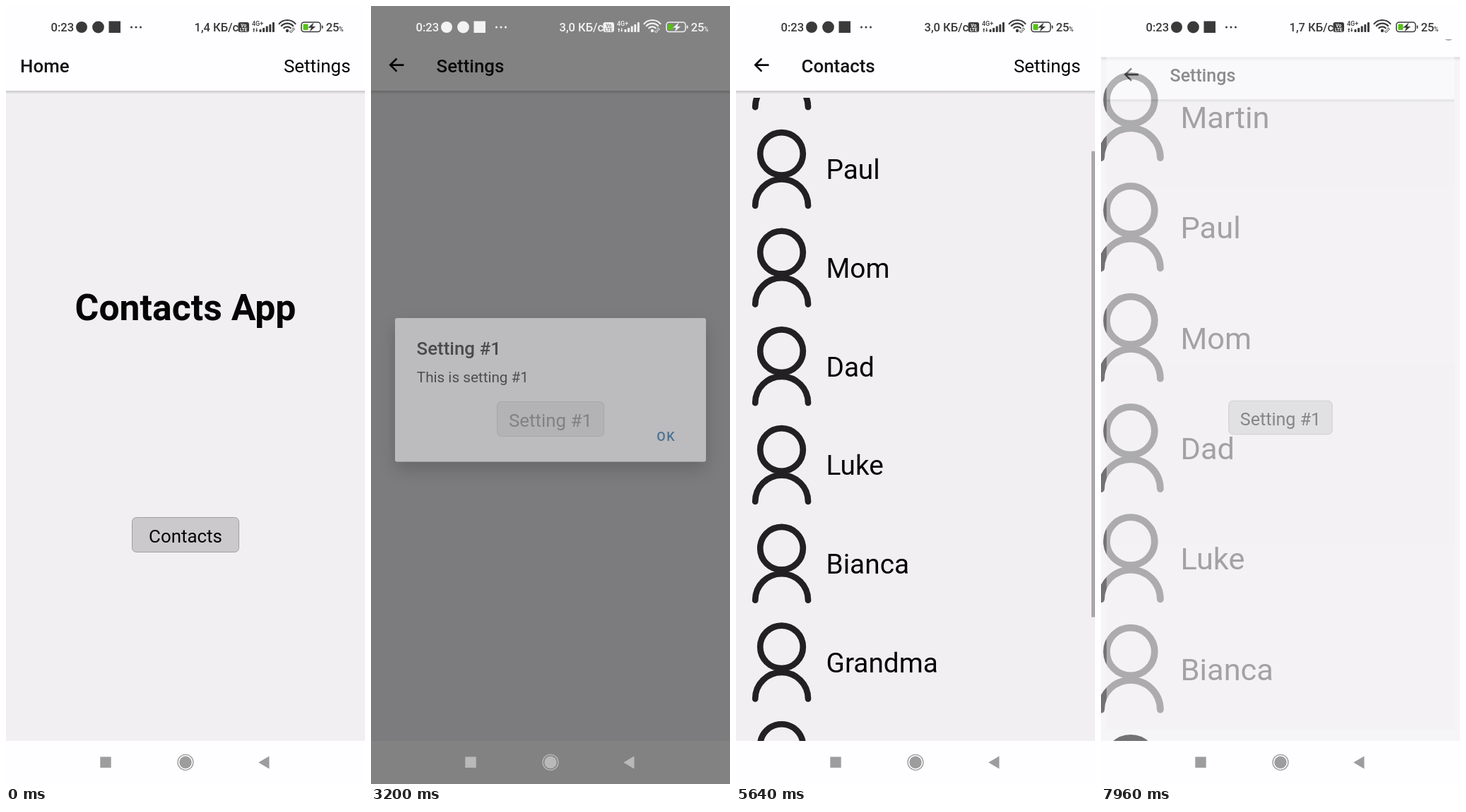
An HTML page for the animation above (8 s loop, 508 by 1102 pixels).

```html
<!DOCTYPE html>
<html lang="en">
<head>
<meta charset="utf-8">
<title>Contacts App</title>
<style>
html, body { margin: 0; width: 100%; height: 100%; overflow: hidden; background: #fefdff; }
svg { display: block; width: 508px; height: 1102px; font-family: Roboto, sans-serif; }
text { white-space: pre; }
</style>
</head>
<body>
<svg id="stage" viewBox="0 0 508 1102" xmlns="http://www.w3.org/2000/svg"></svg>
<script>
const LOOP = 8000, STEP = 40;
const ROW = 139.7, TOP = 130, BOTTOM = 1041, MAX = 346.3;
const WHITE = '#fefdff', INK = '#060506';
const people = ['Martin', 'Paul', 'Mom', 'Dad', 'Luke', 'Bianca', 'Grandma', 'Grandpa', 'Tutor Omar'];

const text = (s, x, y, size, more = '') => `<text x="${x}" y="${y}" font-size="${size}" ${more}>${s}</text>`;
const rect = (x, y, w, h, more = '') => `<rect x="${x}" y="${y}" width="${w}" height="${h}" ${more}/>`;
const circle = (x, y, r, more = '') => `<circle cx="${x}" cy="${y}" r="${r}" ${more}/>`;
const path = (d, more = '') => `<path d="${d}" ${more}/>`;
const group = (id, body, more = '') => `<g id="${id}" ${more}>${body}</g>`;

const arrow = path('M46.5 83.6H28M36.4 74.5L27.3 83.6L36.4 92.7', `fill="none" stroke="${INK}" stroke-width="2.6"`);
const title = (s, x) => text(s, x, 94, 25.9, 'font-weight="500" fill="#141314"');
const link = id => group(id, text('Settings', 487.5, 94, 25.9, 'text-anchor="end"'));
const button = (id, s, y) => group(id,
  rect(178.5, y + .5, 151, 49, 'rx="6" fill="#cbc9cb" stroke="#a19fa1"') +
  text(s, 254, y + 36, 25.9, 'text-anchor="middle"'));

const page = (id, header, body) => group(id,
  rect(0, 0, 508, BOTTOM, 'fill="#f1eff2"') +
  rect(0, 119, 508, 6, 'fill="url(#shade)"') +
  rect(0, 0, 508, 120, `fill="${WHITE}"`) + header + body, `fill="${INK}"`);

const person = (name, i) => `<g transform="translate(0 ${TOP + i * ROW})">` +
  circle(64.5, 44, 30.3, 'class="pen"') + path('M27.2 117.5a37.4 37.4 0 0 1 74.8 0', 'class="pen"') +
  text(name, 127.5, 80, 38.8) + '</g>';

const list = '<g clip-path="url(#view)">' +
  group('list', people.map(person).join(''), 'stroke-linecap="round"') +
  group('glow', path('', 'fill="#5a1fc0"')) +
  rect(503, TOP, 5, 660, 'id="bar" fill="#a9a7a9"') + '</g>';

const statusBar = () => {
  const bars = [4, 6, 8.5, 11, 14].map((h, i) => rect(358.5 + i * 4.6, 37 - h, 3, h, 'rx=".8"')).join('');
  const arc = r => path(`M${398 - r * .78} ${37 - r * .72}A${r} ${r} 0 0 1 ${398 + r * .78} ${37 - r * .72}`,
    'fill="none" stroke="currentColor" stroke-width="2.1"');
  return text('0:23', 63.5, 35.5, 16.6) +
    circle(107, 30, 8) + circle(130.5, 30, 8.4) + rect(145.5, 21.5, 16.5, 16.5) +
    [177.5, 184, 190.5].map(x => circle(x, 30, 1.5)).join('') +
    text('', 266.5, 35.5, 16.5, 'id="speed"') +
    rect(328.5, 23, 15.5, 14, 'rx="3"') +
    group('badge', text('Vo', 336.2, 29.5, 6.5, 'text-anchor="middle"') +
      text('LTE', 336.2, 35.7, 6.5, 'text-anchor="middle"'), 'font-weight="700"') +
    text('4G+', 348, 28, 9) +
    path('M349 33.5l1.7-2.3 1.7 2.3h-1.1v3.5h-1.2v-3.5zM353 34.2h1.1v-3h1.2v3h1.1l-1.7 2.5z') + bars +
    [15.5, 11.3, 7].map(arc).join('') + circle(398, 35, 2.2) +
    path('M403 35.5l3.2-3.2M404.2 37.5a2 2 0 0 1-2.4-2.6M405.2 31.4a2 2 0 0 1 2.7 2.7M404 37.2l3.2-3.2',
      'fill="none" stroke="currentColor" stroke-width="1"') +
    rect(418, 23, 27, 13.5, 'rx="3.8" fill="none" stroke="currentColor" stroke-width="1.5"') +
    rect(420.5, 25.5, 7, 8.5, 'rx="1" fill="#56c116"') +
    path('M435.5 23.5l-8.3 7.2h4.6l-2 5.5 8.4-7.3h-4.7z') +
    rect(446.8, 27.5, 1.7, 4.5, 'rx=".8"') +
    text('25', 452.7, 35.5, 16.6) + text('%', 471, 35.5, 9);
};

const navBar = rect(133.3, 1063.5, 15.4, 15.4) + circle(254, 1071.3, 8.7) +
  circle(254, 1071.3, 11, 'fill="none" stroke="currentColor" stroke-width="1.3"') +
  path('M357.3 1071.4L372.5 1062.4V1080.6z');

const dialog = rect(34, 442, 440, 203.5, 'rx="3" fill="#faf8fc" filter="url(#drop)"') +
  text('Setting #1', 64.5, 493.5, 25.9, 'font-weight="500" fill="#1e1d1f"') +
  text('This is setting #1', 64.8, 533, 20.7, 'fill="#252426"') +
  text('OK', 404.2, 616, 18.1, 'font-weight="500" letter-spacing="1.5" fill="#1c6aa6"');

document.getElementById('stage').innerHTML = `
<defs>
  <style>.pen { fill: none; stroke: #222022; stroke-width: 8.7; }</style>
  <linearGradient id="shade" x2="0" y2="1">
    <stop offset=".15" stop-color="#000" stop-opacity=".17"/>
    <stop offset="1" stop-color="#000" stop-opacity="0"/>
  </linearGradient>
  <filter id="drop" x="-20%" y="-30%" width="140%" height="170%">
    <feDropShadow dx="0" dy="11" stdDeviation="12" flood-opacity=".32"/>
  </filter>
  <clipPath id="view">${rect(0, TOP, 508, BOTTOM - TOP)}</clipPath>
</defs>
${rect(0, 0, 508, 1102, `fill="${WHITE}"`)}
${page('home', title('Home', 20) + link('homeLink'),
    text('Contacts App', 254, 445, 51.7, 'font-weight="700" text-anchor="middle"') + button('open', 'Contacts', 724))}
${page('contacts', arrow + title('Contacts', 92.5) + link('listLink'), list)}
${page('settings', arrow + title('Settings', 92.5), button('alert', 'Setting #1', 560))}
${rect(0, 0, 508, 47, `fill="${WHITE}"`)}${rect(0, BOTTOM, 508, 61, `fill="${WHITE}"`)}
${rect(0, 0, 508, 1102, 'id="dim"')}
${group('status', statusBar(), 'fill="currentColor" font-weight="500"')}
${group('nav', navBar, 'fill="currentColor"')}
${group('dialog', dialog)}`;

const el = id => document.getElementById(id);
const set = (id, name, value) => el(id).setAttribute(name, value);
const fade = (id, a) => set(id, 'opacity', a);
const ramp = (t, a, b) => Math.min(1, Math.max(0, (t - a) / (b - a)));
const mix = (a, b, k) => a + (b - a) * k;
const grey = v => `rgb(${v},${v},${v})`;
const smooth = k => k * k * (3 - 2 * k);
const between = (t, a, b) => t >= a && t < b;

const bez = (a, b, c, d, u) => {
  const v = 1 - u;
  return a * v * v * v + 3 * b * u * v * v + 3 * c * u * u * v + d * u * u * u;
};
// Two joined curves: short sharp start, long slow settle.
function settle(x) {
  if (x <= 0) return 0;
  if (x > .64) return 1;
  const [xs, ys] = x < 1 / 6
    ? [[0, .05, .13333, 1 / 6], [0, 0, .06, .4]]
    : [[1 / 6, .20833, .25, 1], [.4, .82, 1, 1]];
  let lo = 0, hi = 1;
  for (let i = 0; i < 24; i++) {
    const m = (lo + hi) / 2;
    if (bez(...xs, m) < x) lo = m; else hi = m;
  }
  return bez(...ys, lo);
}

function place(id, scale, alpha) {
  set(id, 'transform', `translate(254 520) scale(${scale}) translate(-254 -520)`);
  set(id, 'display', alpha > 0 ? 'inline' : 'none');
  fade(id, alpha);
}
function push(from, to, ms) {
  const p = settle(ms / 400), shown = ramp(ms, 50, 170);
  place(from, 1 + .15 * p, shown < 1 ? 1 - ramp(ms, 30, 230) * .98 : 0);
  place(to, .85 + .15 * p, shown);
}
function pop(from, to, ms) {
  const p = settle(ms / 400);
  place(to, 1.15 - .15 * p, mix(.4, 1, ramp(ms, 0, 150)));
  place(from, 1 - .15 * p, 1 - ramp(ms, 35, 155));
}

function glow(t) {
  const low = t < 6600;
  const k = low ? ramp(t, 6080, 6200) * (1 - smooth(ramp(t, 6220, 6500)))
                : ramp(t, 6960, 7080) * (1 - smooth(ramp(t, 7120, 7660)));
  const h = 38 * k, edge = low ? BOTTOM : TOP, peak = low ? edge - h : edge + h;
  const half = 308, x = low ? 320 : 344;
  const r = h > .1 ? (half * half + h * h) / (2 * h) : 1;
  const d = h > .1 ? `M${x - half} ${edge}A${r} ${r} 0 0 ${low ? 1 : 0} ${x} ${peak}A${r} ${r} 0 0 ${low ? 1 : 0} ${x + half} ${edge}z` : '';
  el('glow').firstChild.setAttribute('d', d);
  fade('glow', .11 * Math.sqrt(k));
}

function draw(t) {
  ['home', 'contacts', 'settings'].forEach(id => place(id, 1, 0));
  if (t < 3700) push('home', 'settings', t - 785);
  else if (t < 4500) pop('settings', 'home', t - 3702);
  else if (t < 7400) push('home', 'contacts', t - 4782);
  else push('contacts', 'settings', t - 7855);

  fade('homeLink', between(t, 640, 800) ? .5 : 1);
  fade('alert', between(t, 2320, 2440) ? .5 : 1);
  fade('open', between(t, 4400, 4800) ? .5 : 1);
  fade('listLink', between(t, 7800, 7880) ? .5 : 1);

  const y = MAX * (smooth(ramp(t, 5365, 6120)) - smooth(ramp(t, 6400, 7030)));
  set('list', 'transform', `translate(0 ${-y})`);
  set('bar', 'y', TOP + y * 251 / MAX);
  glow(t);

  const dim = t < 3165 ? .6 * ramp(t, 2430, 2640) : .6 * (1 - ramp(t, 3165, 3515)) ** 2;
  const box = t < 3165 ? 1 - (1 - ramp(t, 2430, 2580)) ** 2 : (1 - ramp(t, 3165, 3315)) ** 2.5;
  const tint = ramp(t, 2450, 2590) - ramp(t, 3280, 3440);
  fade('dim', dim);
  fade('dialog', box);
  set('dialog', 'display', box > 0 ? 'inline' : 'none');
  set('status', 'color', grey(mix(58, 243, tint)));
  set('badge', 'fill', grey(mix(254, 135, tint)));
  set('nav', 'color', grey(mix(157, 185, tint)));
  el('speed').textContent = (t < 2800 ? '1,4' : t < 6800 ? '3,0' : '1,7') + ' КБ/с';
}

const start = performance.now();
function tick() {
  const t = (performance.now() - start) % LOOP;
  draw(Math.floor(t / STEP) * STEP);
  requestAnimationFrame(tick);
}
tick();
</script>
</body>
</html>
```
